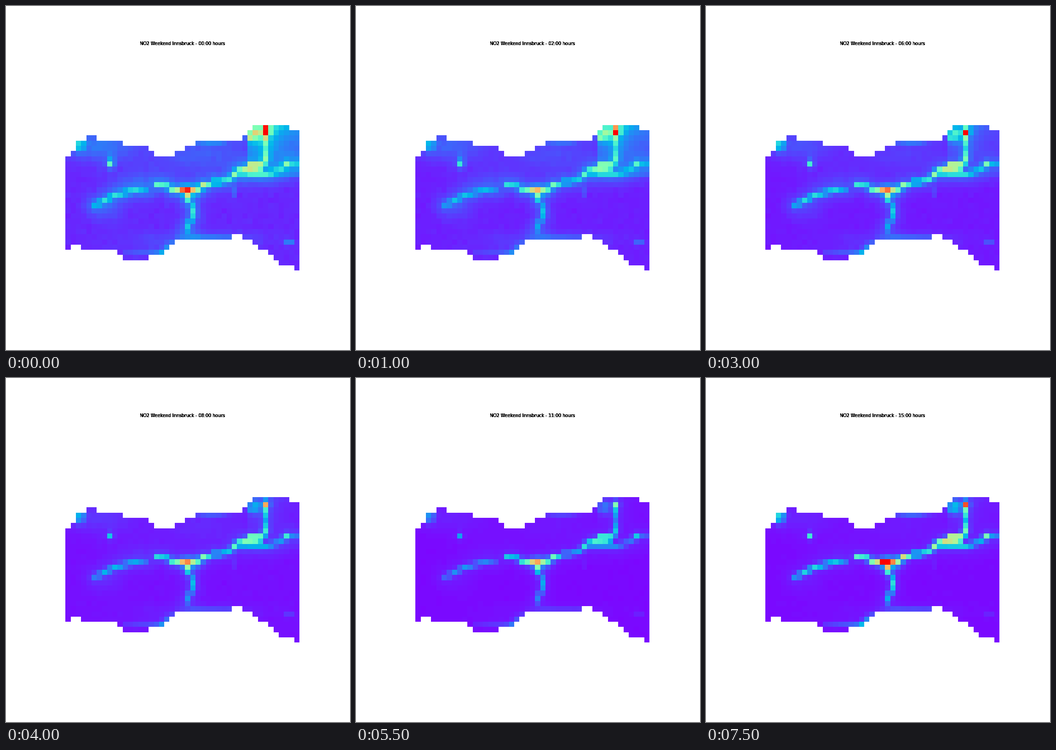
Recreate the animation shown at these times as a matplotlib script. Size 748 by 748 pixels, loop 8 s.

```python
import numpy as np
import matplotlib.pyplot as plt
from matplotlib.animation import FuncAnimation

SIZE, DPI = 748, 64
ROWS, COLS, CELL = 28, 45, 11.305
LEFT, TOP = 129.4, 258.8
HOURS = 16

r, c = np.mgrid[:ROWS, :COLS]

# Outline of the region: (column count, first row) and (column count, end row)
UPPER = [(1, 6), (1, 5), (2, 3), (2, 2), (5, 3), (5, 4), (1, 5), (4, 6),
         (2, 5), (2, 4), (9, 3), (1, 2), (1, 1), (7, 0), (2, 1)]
LOWER = [(1, 24), (2, 23), (7, 24), (1, 25), (5, 26), (3, 25), (1, 24),
         (1, 23), (11, 22), (2, 21), (2, 22), (1, 23), (2, 24), (1, 25),
         (1, 26), (3, 27), (1, 28)]

# Routes as key points: column, row, strength
WEST = [(5, 15, .15), (7, 14, .27), (9, 13, .28), (13, 12, .24), (15, 12, .1)]
EAST = [(28, 10.5, .35), (29, 10.5, .35), (31, 10, .3), (32, 9, .52),
        (33, 8, .42), (34, 8, .58), (35, 7.5, 1.25), (36, 7.5, 1.25),
        (37, 7.5, .75), (38, 6, .42), (38, 4, .2), (38, 2, .38), (38, 1, .65)]
SIDE = [(33, 9, .24), (38, 9, .24), (41, 8, .18), (42, 7, .44), (43, 7, .12),
        (44, 7, .12)]
SOUTH = [(11, 24, .05), (17, 24, .12), (18, 24, .24), (20, 22, .06),
         (25, 21, .06), (31, 21, .06)]
MAIN = [(17, 11, .38), (19, 11, .3), (20, 12, .45), (21, 12, .56),
        (22, 12, .8), (23, 12, .83), (24, 12, .55), (25, 12, .4),
        (26, 11, .62), (27, 11, .38)]
BRANCH = [(23, 12, .8), (23, 13, .48), (23, 14, .28), (24, 15, .2),
          (24, 16, .3), (24, 17, .25), (23, 19, .2), (23, 20, .08)]

# Daily course of each part
HOUR_KEYS = [0, 2, 6, 8, 11, 13, 15]
COURSE = {
    "calm": [1, .8, .65, .42, .25, .22, .28],
    "plume": [1, .82, .42, .17, .06, .05, .14],
    "road": [.72, .58, .85, .7, .58, .66, 1],
    "town": [.75, .58, .7, .7, .68, .8, 1],
}


def steps(pairs):
    counts, rows = zip(*pairs)
    return np.repeat(rows, counts)


def spot(row, col, sr, sc, amp):
    return amp * np.exp(-((r - row) / sr) ** 2 / 2 - ((c - col) / sc) ** 2 / 2)


def trace(points, width=.55):
    """Strongest influence at each cell from samples along a route."""
    keys = np.arange(len(points))
    s = np.linspace(0, keys[-1], 20 * keys[-1] + 1)
    x, y, amp = (np.interp(s, keys, v) for v in zip(*points))
    d2 = (c[..., None] - x) ** 2 + (r[..., None] - y) ** 2
    return (amp * np.exp(-d2 / width ** 2)).max(axis=-1)


def level(points):
    return [(x, y, 1) for x, y, _ in points]


def calm():
    rng = np.random.default_rng(4)
    field = .05 + .004 * rng.standard_normal((ROWS, COLS))
    near = [trace(level(p), 2) for p in (WEST, EAST, SIDE, MAIN, BRANCH)]
    field += .08 * np.max(near, axis=0)
    return field + sum([
        spot(3.5, 6, 2, 5, .11), spot(5, 26, 3, 7, .07),
        spot(10, 13, 2, 4, .04), spot(16, 8, 2, 2, .04),
        spot(22, 18, 1.5, 6, .03), spot(21.5, 28, 1, 6, .06),
        spot(10, 40, 1, 6, .03), spot(12.5, 32, .8, .4, .07),
        spot(22, 42.5, .4, .7, .14)])


def plume():
    field = .07 + .22 * np.exp(-r / 2.5 - np.abs(c - 38) / 8)
    field[(r > 9) | (c < 35)] = 0
    return field + sum([
        spot(1, 36, .8, 1, .3), spot(.7, 38, .5, .4, 1.4),
        spot(.5, 39, .6, .5, .12), spot(2, 35, .4, .4, .25),
        spot(6.6, 8.2, .9, .6, .15)])


def road():
    routes = np.max([trace(p) for p in (WEST, EAST, SIDE, SOUTH)], axis=0)
    return routes + sum([
        spot(7, 8, .4, .4, .33), spot(3.2, 2.2, .9, .7, .3),
        spot(1.5, 35.8, .9, .9, .2), spot(3, 27.5, .4, 2.5, .1)])


PARTS = {
    "calm": calm(),
    "plume": plume(),
    "road": road(),
    "town": (np.maximum(trace(MAIN), trace(BRANCH))
             + spot(12.3, 23.3, .9, 1.3, .28)),
}
outside = (r < steps(UPPER)) | (r >= steps(LOWER))


def field_at(hour):
    total = sum(np.interp(hour, HOUR_KEYS, COURSE[k]) * part
                for k, part in PARTS.items())
    return np.ma.array(np.clip(total, 0, 1), mask=outside)


plt.rcParams["font.family"] = "DejaVu Sans"
fig = plt.figure(figsize=(SIZE / DPI, SIZE / DPI), dpi=DPI, facecolor="white")
ax = fig.add_axes([0, 0, 1, 1])
ax.axis("off")
mesh = ax.pcolormesh(LEFT + CELL * np.arange(COLS + 1),
                     TOP + CELL * np.arange(ROWS + 1), field_at(0),
                     cmap="rainbow", vmin=0, vmax=1, antialiased=False)
ax.set_xlim(0, SIZE)
ax.set_ylim(SIZE, 0)

# Stacked copies give the title its heavy, hard-edged look
titles = [fig.text(383.76 / SIZE, 1 - 85.2 / SIZE, "", fontsize=10.8,
                   ha="center", va="baseline") for _ in range(8)]


def update(hour):
    mesh.set_array(field_at(hour))
    for title in titles:
        title.set_text(f"NO2 Weekend Innsbruck - {hour:02d}:00 hours")
    return [mesh, *titles]


anim = FuncAnimation(fig, update, frames=HOURS, interval=500,
                     repeat=True, repeat_delay=0, blit=False)
plt.show()
```
